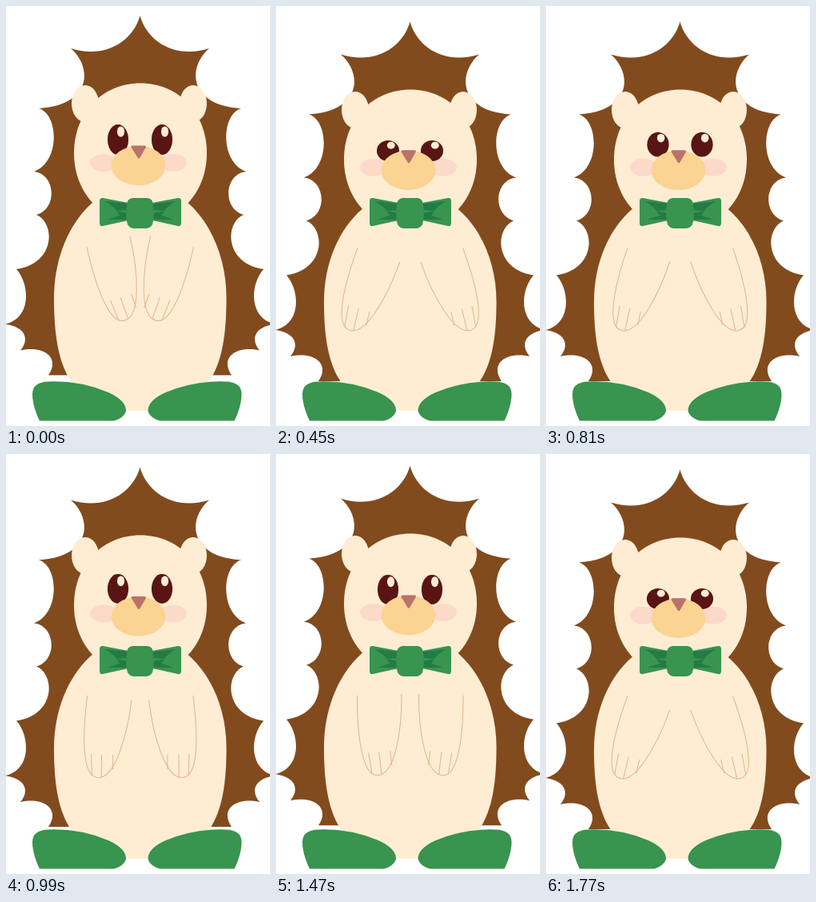
An HTML page for the animation above (1.8 s loop, 330x525 px).

```html
<!DOCTYPE html>
<html lang="en">
<head>
<meta charset="utf-8">
<title>Hedgehog</title>
<style>
  /* bob: 0 = stretched, 1 = crouched */
  @property --bob { syntax: "<number>"; inherits: true; initial-value: 0; }
  @property --arm { syntax: "<number>"; inherits: true; initial-value: 0; }
  @property --look { syntax: "<number>"; inherits: true; initial-value: 0; }
  @property --open { syntax: "<number>"; inherits: true; initial-value: 1; }

  html, body { margin: 0; width: 100%; height: 100%; overflow: hidden; background: #fff; }
  svg { display: block; width: 330px; height: 525px; animation: breathe 1800ms infinite; }

  /* each segment advances in 30 ms steps */
  @keyframes breathe {
    0%       { --bob: 0;    --arm: -13.3; --look: 0;   --open: 1;   animation-timing-function: steps(5); }
    8.3333%  { --bob: .27;  --arm: -.6;   --look: 2.5; --open: .98; animation-timing-function: steps(10); }
    25%      { --bob: .74;  --arm: 19.5;  --look: 14;  --open: .68; animation-timing-function: steps(6); }
    35%      { --bob: 1;    --arm: 28.5;  --look: 10.6; --open: .68; animation-timing-function: steps(1); }
    36.6667% { --bob: .99;  --arm: 28;    --look: 10;  --open: .68; animation-timing-function: steps(11); }
    55%      { --bob: .455; --arm: 6.8;   --look: 1.5; --open: .97; animation-timing-function: steps(7); }
    66.6667% { --bob: .14;  --arm: -7.4;  --look: 0;   --open: 1;   animation-timing-function: steps(3); }
    71.6667% { --bob: 0;    --arm: -13.3; --look: 0;   --open: 1;   animation-timing-function: steps(1); }
    73.3333% { --bob: 0;    --arm: -13.3; --look: 0;   --open: 1;   animation-timing-function: steps(5); }
    81.6667% { --bob: .27;  --arm: -.6;   --look: 2.5; --open: .98; animation-timing-function: steps(10); }
    98.3333% { --bob: .74;  --arm: 19.5;  --look: 14;  --open: .68; animation-timing-function: steps(1); }
    100%     { --bob: .78;  --arm: 21;    --look: 13.4; --open: .68; }
  }

  .spikes { fill: #824b1e; transform: translateY(calc(var(--bob) * 10px)); }
  .skin { fill: #feedd3; }
  .body { transform-origin: 167.5px 506px; transform: scaleY(calc(1 - var(--bob) * .04)); }
  .head { transform: translateY(calc(var(--bob) * 10.8px)); }
  .face { transform: translateY(calc(var(--bob) * 7.8px)); }
  .eyes {
    transform-origin: 0 167px;
    transform: translateY(calc(var(--look) * 1px));
  }
  .eye {
    transform-box: fill-box;
    transform-origin: center;
    transform: scale(calc(1.25 - var(--open) * .25), var(--open));
  }
  .arm {
    fill: none; stroke: #e2b38f; stroke-width: 1; stroke-linecap: round;
    transform-origin: 99.5px 303.5px;
    transform: rotate(calc(var(--arm) * 1deg));
  }
  .green { fill: #38944f; }
  .fold { fill: #247b45; }
</style>
</head>
<body>
<svg viewBox="0 0 330 525">
  <defs>
    <path id="quills" d="M167.5 12C158 46 122 66 81 53C108 76 108 124 41 128C66 135 68 195 35 207
      C62 210 65 253 38 261C62 271 62 322 13 329C30 348 32 390 -1 397.5C24 401 30 416 18 430.5
      C48 424 68 440 53 461.5H170V40Z"/>
    <g id="limb" class="arm">
      <path d="M101.5 302C101 345 105 402 126 402C148 402 157 345 157 301"/>
      <path d="M115 374L119 400M128 373L131 401M142 372L144 389"/>
    </g>
    <g id="wing">
      <path class="green" d="M121 240L153 246V268L121 275Q117 276 117 271V244Q117 239.500 121 240Z"/>
      <path class="fold" d="M123 244L153 247V264L141 261Q137 251 123 244ZM127 267Q140 263 153 257V267Z"/>
      <path class="green" d="M137 256L153 255V259Z"/>
    </g>
    <path id="foot" class="green" d="M42 518.500Q33 500 33 485Q33 470 53 469.500Q92 468 128 483
      Q150 493 150 506Q148 515 135 518.500Z"/>
    <g id="eye" class="eye">
      <ellipse cx="140" cy="167" rx="13" ry="19" fill="#591514"/>
      <ellipse cx="143.500" cy="157" rx="4.600" ry="6.600" fill="#feedd3"/>
    </g>
  </defs>

  <g class="spikes">
    <use href="#quills"/>
    <use href="#quills" transform="matrix(-1 0 0 1 335 0)"/>
  </g>

  <path class="skin body" d="M60 365C60 286 108 222 167.500 222S275.500 286 275.500 365
    C275.500 450 257 506 167.500 506S60 450 60 365Z"/>

  <g class="skin head">
    <ellipse cx="99" cy="122" rx="17" ry="23"/>
    <ellipse cx="234" cy="122" rx="17" ry="23"/>
    <path d="M85 184C85 133 121 96.500 168 96.500S251 133 251 184S214 272 168 272S85 235 85 184Z"/>
  </g>

  <g class="face" fill="#fcdac9">
    <ellipse cx="122" cy="196" rx="17" ry="11"/>
    <ellipse cx="209" cy="196" rx="17" ry="11"/>
  </g>
  <g class="eyes">
    <use href="#eye"/>
    <use href="#eye" x="55"/>
  </g>
  <g class="face">
    <ellipse cx="165.500" cy="199.500" rx="34" ry="24.700" fill="#fbd392"/>
    <path d="M158 176H173.500L166 189Z" fill="#b8736b" stroke="#b8736b" stroke-width="3" stroke-linejoin="round"/>
  </g>

  <use href="#limb"/>
  <use href="#limb" transform="matrix(-1 0 0 1 335.5 0)"/>

  <use href="#wing"/>
  <use href="#wing" transform="matrix(-1 0 0 1 336 0)"/>
  <path class="green" d="M158 240H177Q184 241 184 249Q185.500 259 184 269Q183 277 176 278H159
    Q152 277 151 269Q149.500 259 151 249Q151 241 158 240Z"/>

  <use href="#foot"/>
  <use href="#foot" transform="matrix(-1 0 0 1 327.5 0)"/>
</svg>
</body>
</html>
```
